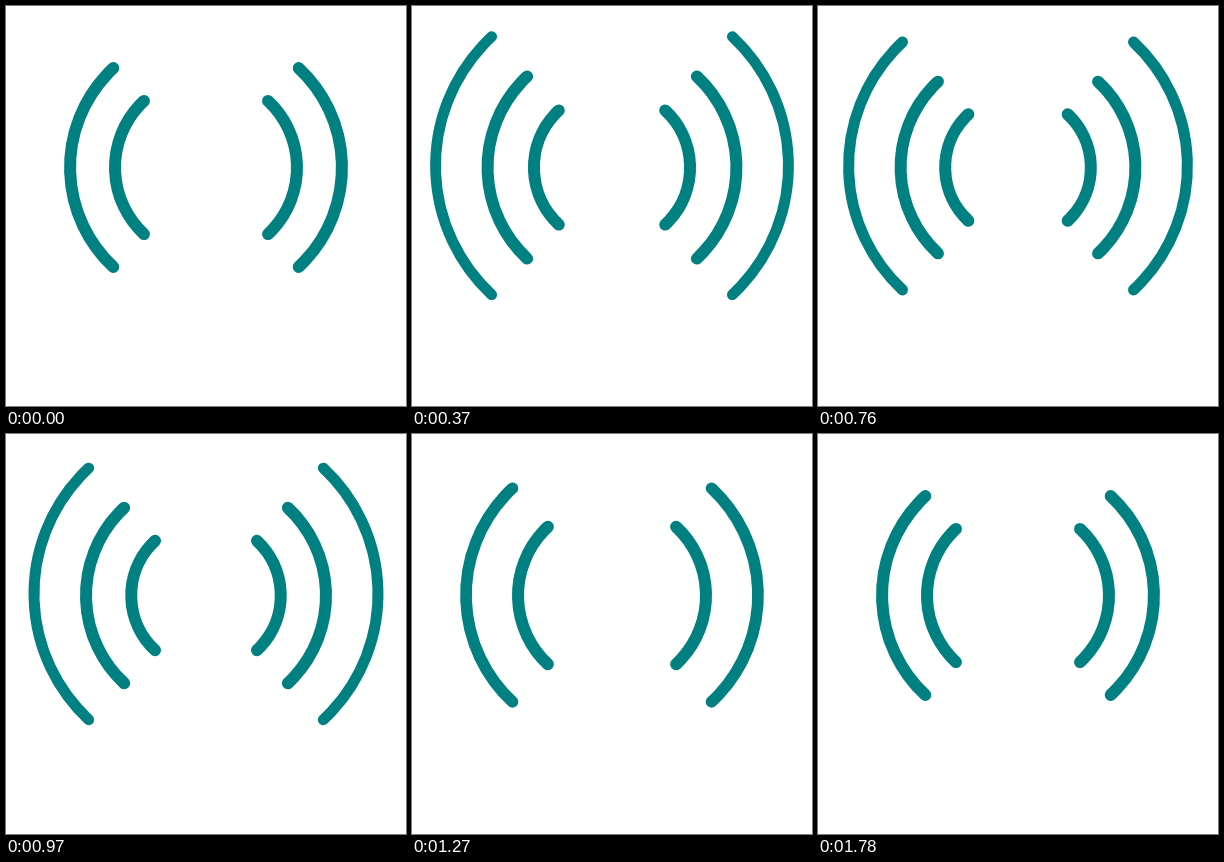
These frames come from a looping animation (400 by 400 pixels, 1.9 s). An HTML page with a canvas:

```html
<!DOCTYPE html>
<html>
<head>
<meta charset="utf-8">
<style>
html, body { margin: 0; height: 100%; overflow: hidden; background: #fff; }
canvas { display: block; }
</style>
</head>
<body>
<canvas id="stage" width="400" height="400"></canvas>
<script>
const ctx = document.getElementById('stage').getContext('2d');
const LOOP = 1900, HOLD = 130, STEP = 30, LAST = 56;
const SPREAD = 47 * Math.PI / 180;
const BIRTH = -0.22, DEATH = 2.29;
const clamp = (v, lo, hi) => Math.min(hi, Math.max(lo, v));

// Waves emitted so far: steady rate, easing in and out of the rest pose.
function progress(n) {
  const easeIn = 0.772 * clamp(1 - n / 15, 0, 1) ** 2.4;
  const easeOut = 0.628 * clamp((n - 41) / 15, 0, 1) ** 2.4;
  return -0.25 + 0.15 * n + easeIn - easeOut;
}

// Radius of a wave by its age in cycles.
const radius = age => 94 + (age - 0.6) * (age < 0.6 ? 38.5 : 52);

function drawPair(r) {
  const over = Math.max(0, r - 136);
  const cy = 161.5 - over * 0.045;
  ctx.lineWidth = 12 - over * 0.03;
  for (const mid of [0, Math.PI]) {
    ctx.beginPath();
    ctx.arc(200, cy, r, mid - SPREAD, mid + SPREAD);
    ctx.stroke();
  }
}

function draw(t) {
  const n = t < HOLD ? 0 : Math.min(LAST, Math.floor((t - HOLD) / STEP) + 1);
  const s = progress(n);
  const phase = s - Math.floor(s);
  // At rest the outer pair sits closer to the inner one.
  const rest = Math.max(clamp(1 - n / 4, 0, 1), clamp((n - 54) / 2, 0, 1));
  ctx.clearRect(0, 0, 400, 400);
  ctx.strokeStyle = '#008080';
  ctx.lineCap = 'round';
  for (let age = phase - 1; age < DEATH; age++) {
    if (age > BIRTH) drawPair(radius(age) - (age > 1 ? 6 * rest : 0));
  }
}

const start = performance.now();
function tick() {
  draw((performance.now() - start) % LOOP);
  requestAnimationFrame(tick);
}
tick();
</script>
</body>
</html>
```
